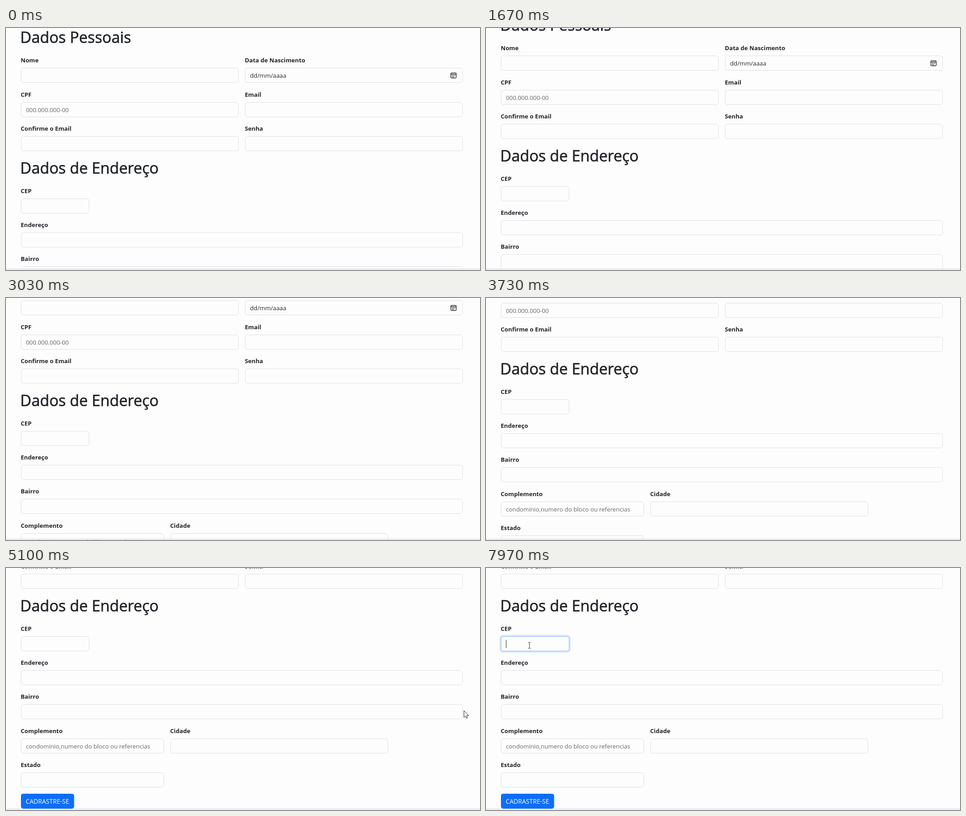
Write an HTML page that moves like this. It is 1047 by 535 pixels and loops after 8 s.

```html
<!DOCTYPE html>
<html lang="pt-BR">
<head>
<meta charset="utf-8">
<style>
  html, body { margin: 0; width: 100%; height: 100%; overflow: hidden; background: #fdfdfd; }
  svg { display: block; }
  text { font-family: "Open Sans", "Noto Sans", sans-serif; font-size: 13.25px; fill: #212529; }
  .title { font-size: 33.8px; stroke: #212529; stroke-width: 0.7px; }
  .label { font-size: 13.15px; font-weight: 700; }
  .hint { fill: #63676b; }
  .button { font-size: 13.8px; fill: #fff; }
  .field { fill: #fdfdfd; stroke: #dedfe7; }
</style>
</head>
<body>
<svg id="stage" width="1047" height="535" viewBox="0 0 1047 535">
  <g id="page"></g>
  <rect y="532" width="1047" height="2" fill="#e1e1f0"/>
  <g id="cursor">
    <path id="arrow" d="M.5 .5V15.5L4 12.2L6.3 17.3L8.6 16.3L6.4 11.3H11.2Z" fill="#fff" stroke="#222"/>
    <path id="beam" d="M-3 -6.5H-1L0 -5.5L1 -6.5H3M0 -5.5V5.5M-3 6.5H-1L0 5.5L1 6.5H3" fill="none" stroke="#222"/>
  </g>
</svg>
<script>
const LOOP = 8000;
const FOCUS_AT = 7870;
const page = document.getElementById('page');
const cursor = document.getElementById('cursor');
const arrow = document.getElementById('arrow');
const beam = document.getElementById('beam');
const fields = [];

function add(tag, attrs, content = '') {
  const node = document.createElementNS('http://www.w3.org/2000/svg', tag);
  for (const name in attrs) node.setAttribute(name, attrs[name]);
  node.textContent = content;
  page.append(node);
  return node;
}

function write(kind, x, y, content) {
  return add('text', { class: kind, x, y }, content);
}

// y is the top edge of the input; its label sits above it
function addField(label, x, y, width, hint = '', hintKind = 'hint') {
  write('label', x - 0.5, y - 12, label);
  const node = add('rect', { class: 'field', x: x + 0.5, y: y + 0.5, width: width - 1, height: 32, rx: 5 });
  if (hint) write(hintKind, x + 11, y + 22, hint);
  fields.push({ x, y, width });
  return node;
}

write('title', 31.5, 33, 'Dados Pessoais');
addField('Nome', 33, 88, 481);
addField('Data de Nascimento', 528, 88, 481, 'dd/mm/aaaa', 'value');
addField('CPF', 33, 164, 481, '000.000.000-00');
addField('Email', 528, 164, 481);
addField('Confirme o Email', 33, 239, 481);
addField('Senha', 528, 239, 481);
add('path', {
  d: 'M984 99.5H993Q994.5 99.5 994.5 101V109Q994.5 110.5 993 110.5H984Q982.5 110.5 982.5 109V101Q982.5 99.5 984 99.5ZM982.5 102.5H994.5M985 105.5H987M988 105.5H989.5M990.5 105.5H992M985 108H987M988 108H989.5',
  fill: 'none', stroke: '#222', 'stroke-width': 1.3
});

write('title', 31.5, 322, 'Dados de Endereço');
const glow = add('rect', { fill: '#cfe2ff' });
const cep = addField('CEP', 33, 377, 151);
const caret = add('rect', { x: 44, y: 385, width: 1, height: 18, fill: '#222' });
addField('Endereço', 33, 452, 976);
addField('Bairro', 33, 527, 976);
addField('Complemento', 33, 603, 316, 'condominio,numero do bloco ou referencias');
addField('Cidade', 363, 603, 481);
addField('Estado', 33, 678, 316);
add('rect', { x: 33, y: 725, width: 117.5, height: 33, rx: 5, fill: '#0d6efd' });
write('button', 43.5, 747, 'CADRASTRE-SE');

// Keys are [time, ...values], joined by straight segments
const scrollKeys = [[850, 0], [1670, 27], [3030, 83], [3730, 153], [4370, 198], [4980, 226]];
const cursorKeys = [[4950, 1050, 300], [5800, 830, 385], [6400, 643, 393], [6700, 643, 393], [7600, 100, 178], [7800, 96, 171]];

function sample(keys, time) {
  const next = keys.findIndex(key => key[0] > time);
  if (next === 0) return keys[0].slice(1);
  if (next < 0) return keys[keys.length - 1].slice(1);
  const from = keys[next - 1], to = keys[next];
  const part = (time - from[0]) / (to[0] - from[0]);
  return from.slice(1).map((value, i) => value + (to[i + 1] - value) * part);
}

function show(node, visible) {
  node.style.display = visible ? '' : 'none';
}

function drawCursor(time, scroll) {
  const [x, y] = sample(cursorKeys, time).map(Math.round);
  const overField = fields.some(f =>
    x >= f.x && x <= f.x + f.width && y + scroll >= f.y && y + scroll <= f.y + 33);
  show(cursor, time >= cursorKeys[0][0]);
  show(beam, overField);
  show(arrow, !overField);
  cursor.setAttribute('transform', `translate(${x} ${y})`);
}

function drawFocus(time) {
  const linear = Math.min(1, Math.max(0, (time - FOCUS_AT) / 150));
  const amount = 1 - (1 - linear) ** 2;
  const spread = 3.5 * amount;
  const box = { x: 33 - spread, y: 377 - spread, width: 151 + 2 * spread, height: 33 + 2 * spread, rx: 5 + spread, opacity: amount };
  for (const name in box) glow.setAttribute(name, box[name]);
  const mix = (from, to) => Math.round(from + (to - from) * amount);
  cep.style.stroke = `rgb(${mix(222, 134)}, ${mix(223, 183)}, ${mix(231, 254)})`;
  show(caret, time >= FOCUS_AT);
}

let start;
function frame(now) {
  start ??= now;
  const time = (now - start) % LOOP;
  const scroll = Math.round(sample(scrollKeys, time)[0]);
  page.setAttribute('transform', `translate(0 ${-scroll})`);
  drawCursor(time, scroll);
  drawFocus(time);
  requestAnimationFrame(frame);
}
requestAnimationFrame(frame);
</script>
</body>
</html>
```
